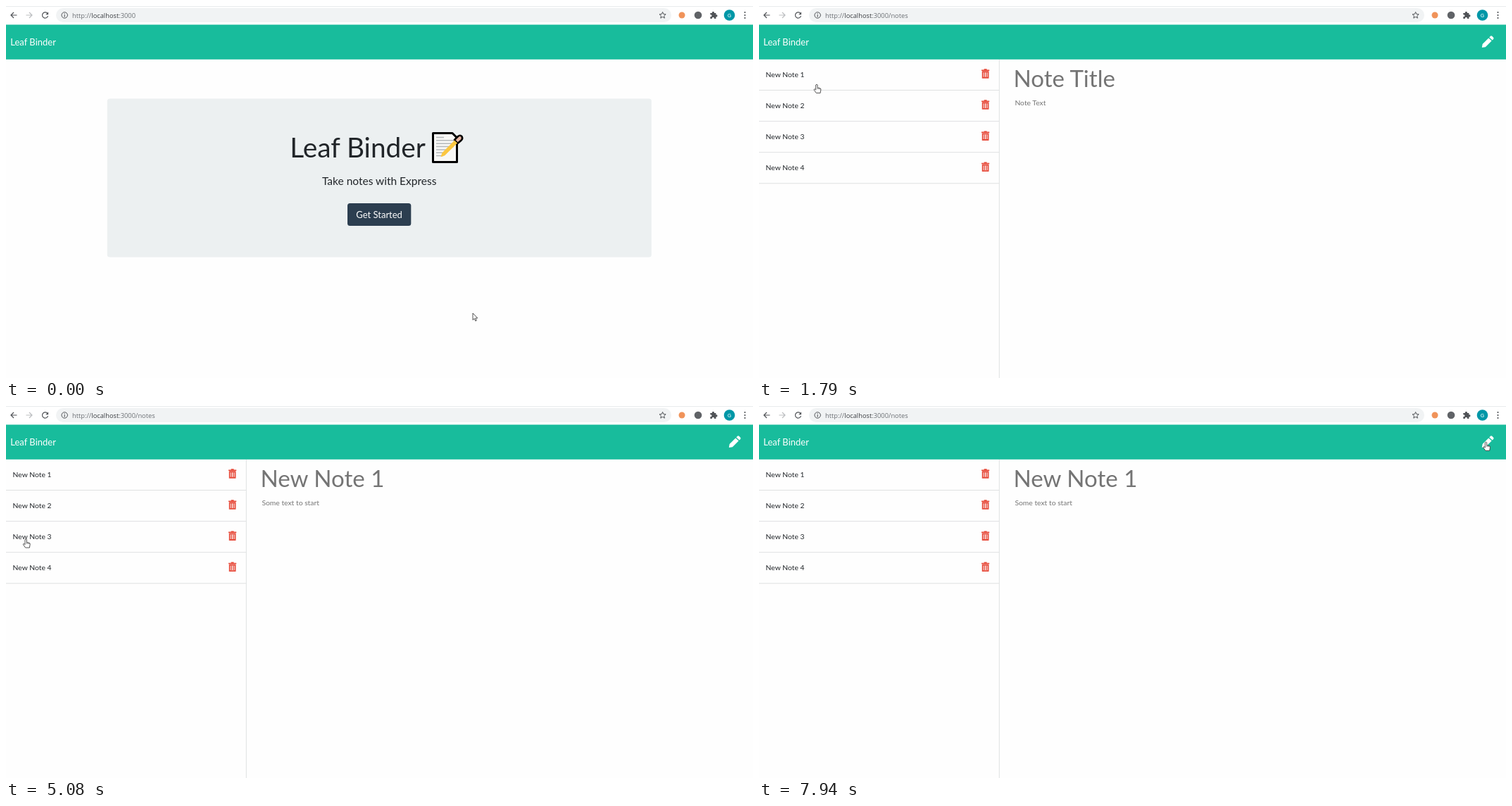
These frames come from a looping animation (1061 px wide and 528 px high, 8 s). An HTML page:

```html
<!DOCTYPE html>
<html lang="en">
<head>
<meta charset="utf-8">
<title>Notes app</title>
<style>
html, body { margin: 0; width: 100%; height: 100%; overflow: hidden; background: #fefefe; }
svg { display: block; width: 1061px; height: 528px; font: 10.33px Lato, sans-serif; fill: #212529; }
text { white-space: pre; }
.url { font: 9.3px "Open Sans", sans-serif; fill: #6b6f74; }
.line { fill: none; stroke: #505357; stroke-width: 1.2; }
.thin { stroke-width: 1; }
.muted { fill: #747474; }
.mid { text-anchor: middle; }
.light { fill: #fff; font-size: 13px; }
.rule { stroke: #dfe1e2; }
.cursor { fill: #fff; stroke: #2b2b2b; stroke-width: .8; stroke-linejoin: round; }
</style>
</head>
<body>
<svg viewBox="0 0 1061 528">
  <defs>
    <g id="trash" fill="none" stroke="#e74c3c">
      <path d="M0 2.2H11.2M3.6 1H7.6" stroke-width="1.6"/>
      <path d="M1.7 4.2H9.5V12.8H1.7Z" stroke-width="1.9"/>
      <path d="M4.3 5V12M6.9 5V12" stroke-width="1.4"/>
    </g>
  </defs>

  <rect width="1061" height="528" fill="#fefefe"/>

  <!-- browser bar -->
  <rect width="1061" height="27" fill="#fff"/>
  <path d="M0 .5H1061" stroke="#e9ebed"/>
  <rect x="71" y="3" width="874" height="20" rx="10" fill="#f1f3f4"/>
  <path class="line" d="M15.5 13H7M11 9L7 13L11 17"/>
  <path class="line" d="M28.5 13H37M33 9L37 13L33 17" style="stroke:#bcbec0"/>
  <g id="reload">
    <path class="line" d="M58.6 10.2A4.1 4.1 0 1 0 59.6 14.2"/>
    <path d="M60.1 8.4V12.3H56.2Z" fill="#505357"/>
  </g>
  <path id="stop" class="line" d="M51.5 9L59.5 17M59.5 9L51.5 17"/>
  <circle class="line thin" cx="83.2" cy="13" r="4.2"/>
  <path class="line" d="M83.2 12.4V15.4M83.2 10.4V11.5"/>
  <text class="url" x="94" y="16.5">http://<tspan fill="#3b3e42">localhost</tspan>:3000<tspan id="path">/notes</tspan></text>
  <polygon id="star" class="line thin"/>
  <circle cx="960" cy="13" r="4.5" fill="#f0935a"/>
  <circle cx="983" cy="13" r="5.3" fill="#606367"/>
  <path fill="#505357" d="M1000.3 10H1003A1.5 1.5 0 1 1 1005.8 10H1008.4V12.4A1.5 1.5 0 1 1 1008.4 15.2V18H1005.8A1.5 1.5 0 1 0 1003 18H1000.3V15.2A1.5 1.5 0 1 0 1000.3 12.5Z"/>
  <circle cx="1027.5" cy="13" r="7.8" fill="#0097a7"/>
  <text class="mid" x="1027.5" y="16" fill="#fff" style="font:8px Roboto, sans-serif">G</text>
  <path class="line" d="M1049.5 9V17.1" style="stroke-width:2.2;stroke-linecap:round;stroke-dasharray:0 4"/>

  <!-- navbar -->
  <rect y="26.5" width="1061" height="49.3" fill="#18bc9c"/>
  <text class="light" x="6.3" y="55.6">Leaf Binder</text>

  <g id="home">
    <rect x="143.8" y="131.5" width="773" height="225" rx="3.5" fill="#ecf0f1"/>
    <text class="mid" x="499.5" y="214.6" font-size="38.75">Leaf Binder</text>
    <g stroke-linejoin="round">
      <path d="M606.5 180.5H634L640.5 187V221.5H606.5Z" fill="#f8f8f6" stroke="#000" stroke-width="3"/>
      <path id="lines" stroke="#b4b8ba" stroke-width="1.5"/>
      <path d="M637 190L642 185Q645 182.5 647.3 185Q649.3 188 646.8 190.4L641.5 195Z" fill="#e9b7a4" stroke="#000" stroke-width="2.6"/>
      <path d="M617.5 214.3L619.4 208.6L637 190.8L641 194.6L623.2 212.2Z" fill="#fbc740"/>
    </g>
    <text class="mid" x="530.2" y="254.2" font-size="15.5">Take notes with Express</text>
    <rect id="ring" x="483.2" y="278.3" width="94" height="35.4" rx="5" fill="#8d959c"/>
    <rect id="button" x="485" y="280" width="90.3" height="32" rx="3.5"/>
    <text class="mid light" x="530.1" y="300.6">Get Started</text>
  </g>

  <g id="notes">
    <path class="rule" d="M341.3 76V528"/>
    <text id="title" class="muted" x="361.6" y="115" font-size="33.06"></text>
    <text id="body" class="muted" x="363.4" y="141.3"></text>
    <g id="list"></g>
    <g id="pencil" fill="#fff" transform="translate(1026.8 42)">
      <path d="M0 17L.9 12.1L9.5 3.4L13.8 7.6L5 16.2Z"/>
      <path d="M10.5 2.4L12.1.8Q13.2-.2 14.4.8L16.3 2.7Q17.2 3.8 16.3 5L14.8 6.5Z"/>
    </g>
  </g>

  <g id="pointer" class="cursor">
    <path id="arrow" d="M0 0V9.6L2.2 7.6L3.8 11.1L5.3 10.4L3.8 7H6.8Z"/>
    <g id="hand">
      <path d="M-1.2.9Q0-.6 1.2.9V4.8L4.6 5.5Q6.2 5.9 6 7.6L5.2 12.4H-.6L-3.6 8.2Q-4.2 6.7-2.6 6.8L-1.2 8Z"/>
      <path d="M1.2 5V7M3 5.4V7.2M4.7 5.8V7.4" stroke-width=".6"/>
    </g>
    <path id="beam" fill="none" d="M-2-5H2M0-5V5M-2 5H2"/>
  </g>
</svg>
<script>
const LOOP = 8000;
const CLICK = 1010, OPEN = 1200, LISTED = 1270, LOADED = 1400, PICK = 2790;
const $ = id => document.getElementById(id);
const show = (id, on) => { $(id).style.display = on ? "" : "none"; };
const range = n => [...Array(n).keys()];

// places the pointer heads for: arrival time, x, y
const stops = [
  [50, 663, 436], [800, 544, 301], [OPEN + 70, 544, 301], [1660, 84, 112],
  [2520, 50, 98], [2740, 46, 92], [3480, 366, 166], [3930, 414.5, 111],
  [4130, 388, 114], [4480, 226, 292], [4960, 6, 194], [5770, 374, 106],
  [6150, 389.5, 110.5], [6590, 478, 117], [7420, 1017, 47], [7940, 1032.5, 51]
];

function pointerAt(t) {
  const next = stops.findIndex(s => s[0] > t);
  if (next < 1) return stops.at(next).slice(1);
  const [t0, x0, y0] = stops[next - 1], [t1, x1, y1] = stops[next];
  const u = (t - t0) / (t1 - t0), e = u * u * (3 - 2 * u);
  return [x0 + (x1 - x0) * e, y0 + (y1 - y0) * e];
}

const overButton = (x, y) => x > 485 && x < 575 && y > 280 && y < 312;

function cursorAt(t, x, y) {
  if (t < OPEN) return overButton(x, y) ? "hand" : "arrow";
  if (t < LISTED + 20 || (x < 341 && y > 76 && y < 252)) return "hand";
  if (y < 76) return x > 1018 ? "hand" : "arrow";
  return x > 352 ? "beam" : "arrow";
}

$("star").setAttribute("points", range(10).map(i => {
  const r = i % 2 ? 2.2 : 4.8, a = i * Math.PI / 5;
  return [932.6 + r * Math.sin(a), 13.3 - r * Math.cos(a)];
}).join(" "));

$("lines").setAttribute("d", range(7).map(i =>
  `M611 ${186.5 + i * 4.35}H${i ? 636 - Math.max(0, i - 3) * 5 : 622}`).join(""));

$("list").innerHTML = range(4).map(i => `<g transform="translate(0 ${i * 44.1})">
  <text x="9.6" y="101.2">New Note ${i + 1}</text>
  <use href="#trash" x="316" y="89"/><path class="rule" d="M0 119.5H341"/></g>`).join("");

function draw(t) {
  const [x, y] = pointerAt(t), open = t >= OPEN, picked = t >= PICK;
  const loading = t >= CLICK && t < LOADED;
  show("home", !open);
  show("notes", open);
  show("path", open);
  show("list", t >= LISTED);
  show("pencil", t >= LISTED);
  show("stop", loading);
  show("reload", !loading);
  show("ring", t >= CLICK);
  $("button").setAttribute("fill", t >= CLICK ? "#1a252f" : overButton(x, y) ? "#1e2b37" : "#2c3e50");
  $("title").textContent = picked ? "New Note 1" : "Note Title";
  $("body").textContent = picked ? "Some text to start" : "Note Text";
  const kind = cursorAt(t, x, y);
  for (const id of ["arrow", "hand", "beam"]) show(id, id === kind);
  $("pointer").setAttribute("transform", `translate(${x.toFixed(1)} ${y.toFixed(1)})`);
}

const start = performance.now();
function tick() {
  draw((performance.now() - start) % LOOP);
  requestAnimationFrame(tick);
}
tick();
</script>
</body>
</html>
```
